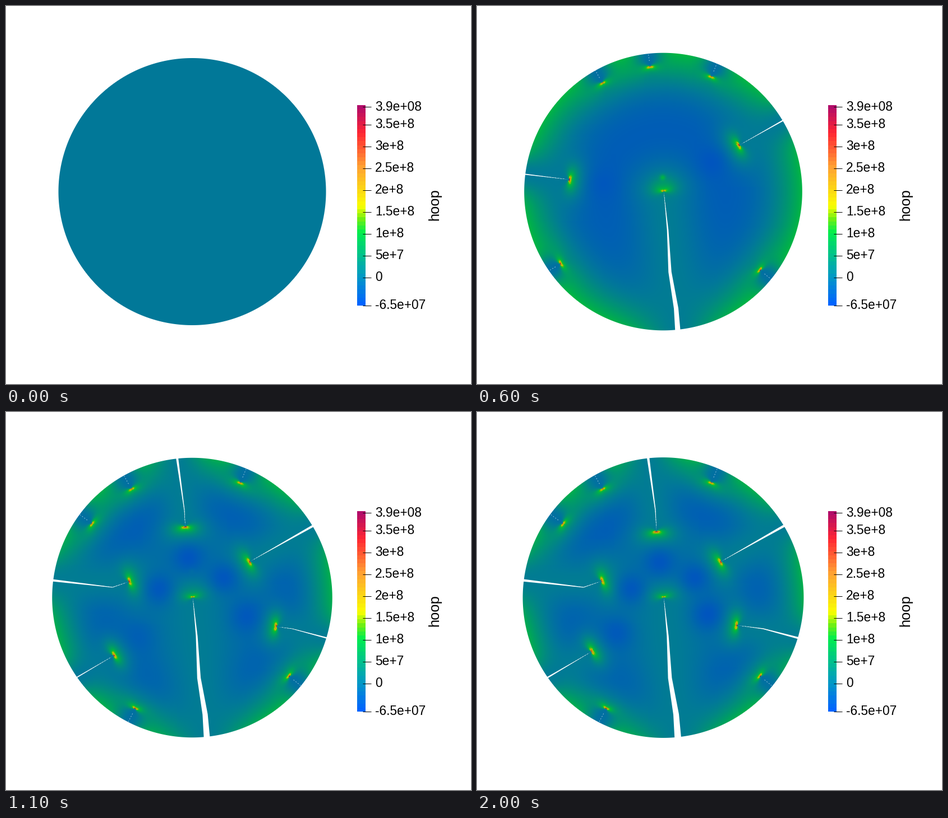
Recreate the animation shown at these times as a matplotlib script. Size 829 by 675 pixels, loop 2.1 s.

```python
import numpy as np
import matplotlib.pyplot as plt
from matplotlib.animation import FuncAnimation
from matplotlib.colors import LinearSegmentedColormap
from matplotlib.patches import Polygon

W, H, DPI = 829, 675, 128
FRAMES, STEP = 21, 100
CENTRE = np.array([332, 331.5])
X0, Y0, N = 78, 78, 508
V_MIN, V_MAX = -0.65, 3.9        # stress in units of 1e8
SHADE = 0.78
NOTCH = 26                       # depth of a fresh crack

STOPS = {-.65: "#0064ff", 0: "#029bc3", 1: "#00ee4e", 1.3: "#6ef014",
         1.6: "#faff00", 2.5: "#ffa332", 3.3: "#ff2632", 3.9: "#b20c69"}
CMAP = LinearSegmentedColormap.from_list(
    "hoop", [((v - V_MIN) / (V_MAX - V_MIN), c) for v, c in STOPS.items()], N=1024)
LUT = (CMAP(np.linspace(0, 1, 1024))[:, :3] * SHADE).astype(np.float32)


def ramp(t, start, end):
    return np.clip((t - start) / (end - start), 0, 1)


def ease_out(u):
    return 1 - (1 - u) ** 3


def smooth(u):
    return u * u * (3 - 2 * u)


def unit(d):
    return d / max(np.hypot(*d), 1e-6)


class Crack:
    """Opens as a notch at `birth`, then runs along its path to the end."""

    def __init__(self, path, birth, run=None, width=0, k=4.2):
        self.path = np.array(path, float)
        self.cum = np.r_[0, np.cumsum(np.hypot(*np.diff(self.path, axis=0).T))]
        self.birth, self.run, self.width, self.k = birth, run, width, k

    def length(self, t):
        n = NOTCH * ramp(t, self.birth - 1, self.birth)
        if self.run:
            n += (self.cum[-1] - NOTCH) * ease_out(ramp(t, *self.run))
        return n

    def at(self, s):
        return np.array([np.interp(s, self.cum, self.path[:, i]) for i in (0, 1)])

    def line(self, end):
        return np.vstack([self.path[self.cum < end], self.at(end)])

    def wedge(self, t):
        n = self.length(t)
        pts = self.line(n)
        s = np.r_[self.cum[self.cum < n], n]
        d = unit(pts[-1] - pts[0])
        opening = self.width * ramp(n, 30, 120) * (.75 + .25 * ramp(t, 4, 14))
        off = np.outer(opening / 2 * (1 - s / n), [-d[1], d[0]])
        pts[0] -= 5 * d
        return np.vstack([pts + off, (pts - off)[::-1]])


def notch(degrees, birth):
    """A short radial crack that never runs."""
    d = np.array([np.cos(np.radians(degrees)), np.sin(np.radians(degrees))])
    return Crack([CENTRE + 249 * d, CENTRE + (249 - NOTCH) * d], birth, k=3.8)


CRACKS = [
    Crack([(358, 582), (355, 540), (344, 475), (340, 400), (333, 331)], 2, (2, 4), 12, k=2.6),
    Crack([(548, 203), (435, 267)], 2, (4, 11), 4.5),
    Crack([(82, 300), (190, 313), (222, 302)], 3, (4, 14), 4.5),
    Crack([(305, 82), (318, 175), (320, 213)], 3, (7, 14), 4.5),
    Crack([(126, 474), (204, 428)], 3, (9, 14), 4),
    Crack([(573, 404), (510, 387), (464, 381)], 9, (9, 14), 4),
    notch(-119.2, 3), notch(39.1, 3), notch(-67.3, 6), notch(-143.5, 7), notch(117.2, 11),
]

GX, GY = np.meshgrid(X0 + .5 + np.arange(N, dtype=np.float32),
                     Y0 + .5 + np.arange(N, dtype=np.float32))
RAD = np.hypot(GX - CENTRE[0], GY - CENTRE[1])
cells = np.random.default_rng(4).uniform(.55, 1.5, (N // 2, N // 2))
GRAIN = np.kron(cells, np.ones((2, 2))).astype(np.float32)


def bump(x, y, spread):
    return np.exp(-((GX - x) ** 2 + (GY - y) ** 2) / spread ** 2)


def relax(v, crack, n):
    """Unload the material on both sides of an open crack."""
    (ax, ay), (bx, by) = crack.path[0], crack.at(n)
    dx, dy = bx - ax, by - ay
    u = np.clip(((GX - ax) * dx + (GY - ay) * dy) / (dx * dx + dy * dy), 0, 1)
    d2 = (GX - ax - u * dx) ** 2 + (GY - ay - u * dy) ** 2
    w = np.exp(-d2 / (22 + .18 * n) ** 2) * min(1, n / NOTCH)
    v += (-.2 + .25 * min(n / 100, 1) - v) * w


def compress(v, crack, n):
    """Compressed zone between a long crack's tip and the centre."""
    tip = crack.at(n)
    x, y = tip + 55 * unit(CENTRE - tip)
    v += (-.63 - v) * .85 * ramp(n, 55, 100) * bump(x, y, 30)


def load_tip(v, crack, n):
    """Opening stress around the crack tip."""
    tip = crack.at(n)
    d = unit(tip - crack.at(n - min(n, 6)))
    i, j = int(tip[1]) - Y0, int(tip[0]) - X0
    win = (slice(max(i - 75, 0), i + 75), slice(max(j - 75, 0), j + 75))
    x, y = GX[win] - tip[0], GY[win] - tip[1]
    a, b = 1.4 * (x * d[0] + y * d[1]), y * d[0] - x * d[1]
    rho, th = np.hypot(a, b) + .8, np.arctan2(b, a)
    shape = np.cos(th / 2) * (1 + np.sin(th / 2) * np.sin(1.5 * th))
    v[win] += crack.k * min(1, n / NOTCH) * shape * np.exp(-rho / 24) / np.sqrt(rho)


def field(t, radius):
    q = RAD / radius
    release = smooth(ramp(t, 4, 11))
    core = -.6 * (1 - np.exp(-t / 1.5)) + .37 * release
    rim = .95 * ramp(t, 0, 2) - .08 * release
    v = core + (rim - core) * q ** (2 + 4 * ramp(t, 2, 12))
    v -= .28 * release * np.exp(-((q - .68) / .2) ** 2)

    active = [(c, c.length(t)) for c in CRACKS if c.length(t) > 1]
    for c, n in active:
        relax(v, c, n)
    for c, n in active:
        if c is not CRACKS[0] and n > 55:
            compress(v, c, n)
    for c, n in active:
        load_tip(v, c, n)
    if t >= 4:                   # fading trace of the run through the centre
        fade = np.exp((4 - t) / 2.5)
        v += fade * (.6 * bump(332, 319, 21) + 1.4 * bump(331, 315 - 4.5 * (t - 4), 5))
    return np.where(v > 1.1, 1.1 + (v - 1.1) * GRAIN, v)


def disk(t):
    radius = 238.5 + 12 * (1 - np.exp(-t / 4))
    v = field(t, radius)
    idx = np.clip((v - V_MIN) / (V_MAX - V_MIN) * 1023, 0, 1023).astype(int)
    cover = np.clip(radius - RAD + .5, 0, 1)[..., None]
    return 1 + (LUT[idx] - 1) * cover


def pt(pixels):
    return pixels * 72 / DPI


fig = plt.figure(figsize=(W / DPI, H / DPI), dpi=DPI, facecolor="white")
ax = fig.add_axes([0, 0, 1, 1])
ax.axis("off")

image = ax.imshow(disk(0), extent=(X0, X0 + N, Y0 + N, Y0),
                  interpolation="nearest", aspect="auto")
bar = CMAP(np.linspace(1, 0, 50))[:, None]
ax.imshow(bar, extent=(626, 641, 535, 177), interpolation="nearest", aspect="auto")
ax.set_xlim(0, W)
ax.set_ylim(H, 0)

for label in ("3.9e+08 3.5e+8 3e+8 2.5e+8 2e+8 1.5e+8 "
              "1e+8 5e+7 0 -6.5e+07").split():
    y = 484.5 - 78 * float(label) / 1e8
    y = np.clip(y, 177.5, 534.5)
    ax.plot([636, 651.5], [y, y], color="black", lw=pt(1), solid_capstyle="butt")
    ax.text(658, y + 6.7, label, family="Liberation Sans", size=pt(22.8), va="baseline")
ax.text(771, 355, "hoop", family="Liberation Sans", size=pt(25.5), rotation=90,
        rotation_mode="anchor", ha="center", va="baseline")

wedges = [ax.add_patch(Polygon(np.zeros((3, 2)), fc="white", ec="none")) for _ in CRACKS]
seams = [ax.plot([], [], color="white", lw=pt(.6), ls=(0, (3, 5)),
                 dash_capstyle="butt")[0] for _ in CRACKS]


def update(t):
    image.set_data(disk(t))
    for crack, wedge, seam in zip(CRACKS, wedges, seams):
        n = crack.length(t)
        wedge.set_visible(n > 1)
        seam.set_visible(n > 10)
        if n > 1:
            wedge.set_xy(crack.wedge(t))
            seam.set_data(*crack.line(max(n - 7, 1)).T)
    return [image, *wedges, *seams]


anim = FuncAnimation(fig, update, frames=FRAMES, interval=STEP, repeat=True,
                     repeat_delay=0, blit=False)
plt.show()
```
